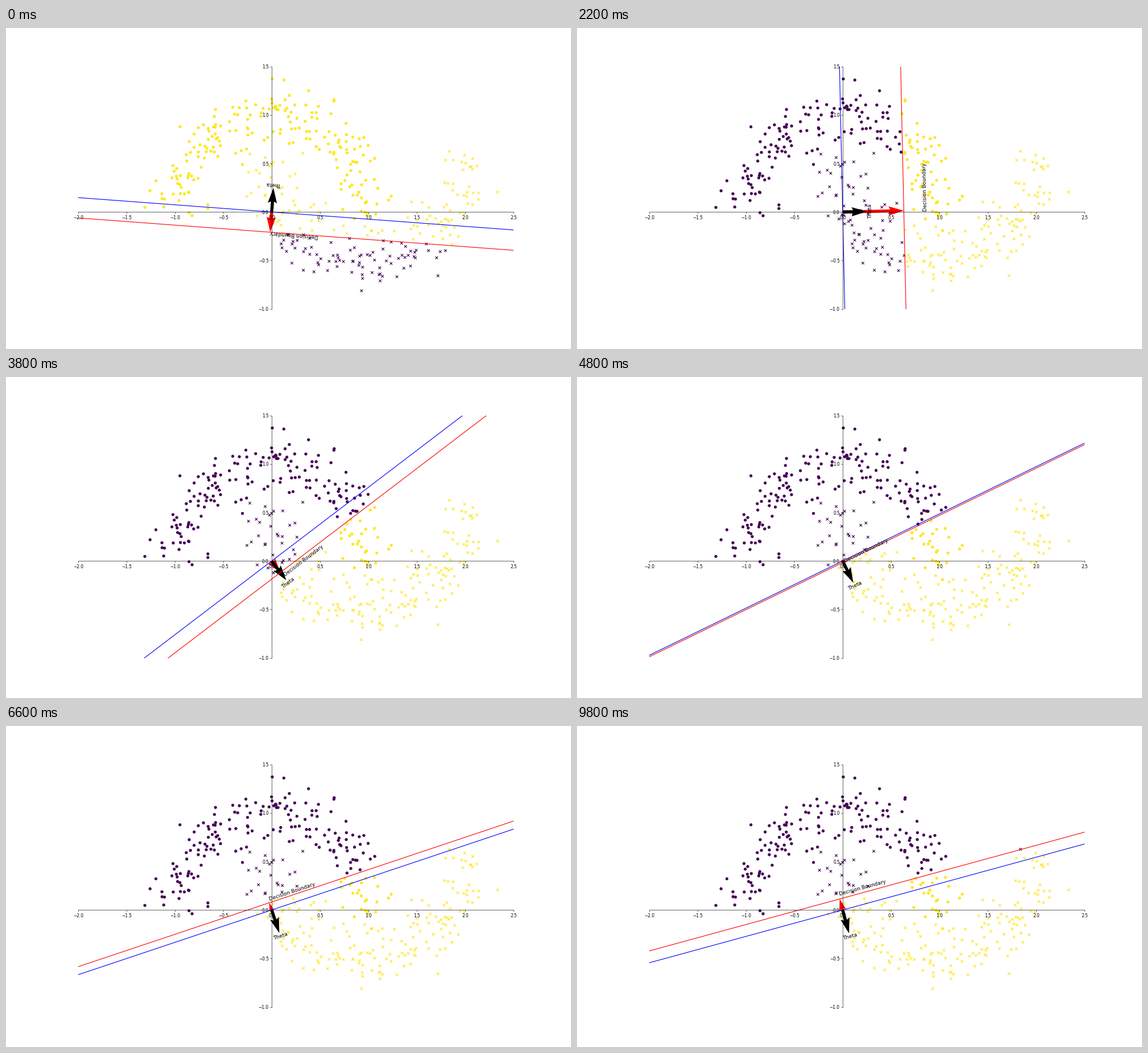
These frames come from a looping animation (993x564 px, 10000 ms). A matplotlib script:

```python
import numpy as np
import matplotlib.pyplot as plt
from matplotlib.animation import FuncAnimation

W, H, DPI = 993, 564, 54
FRAMES, INTERVAL = 50, 200
ARROW = 0.25

# frame: (angle of theta in degrees, signed distance of the boundary)
KEY_POSES = {0: (85.76, -.209), 6: (45, .53), 11: (1.26, .632),
             19: (-52.74, .149), 24: (-64.05, .0145),
             33: (-71.54, -.0785), 49: (-74.76, -.118)}


def moons(count=200, noise=0.15):
    """Two interleaving half circles with clipped Gaussian noise."""
    rng = np.random.RandomState(42)
    t = np.linspace(0, np.pi, count)
    halves = (np.c_[np.cos(t), np.sin(t)],
              np.c_[1 - np.cos(t), 0.5 - np.sin(t)])
    return [half + noise * rng.normal(size=half.shape).clip(-2.5, 2.5)
            for half in halves]


def descend(rate=0.4):
    """Least-squares gradient descent, using the expected moments of the moons."""
    moment = np.array([[1.02, -.068, .5], [-.068, .327, .25], [.5, .25, 1]])
    goal = np.array([.5, -.386, 0])
    p = 3 * np.array([.074, .997, .209])
    path = []
    for _ in range(FRAMES):
        path.append(p)
        p = p + rate * (goal - moment @ p)
    w1, w2, b = np.array(path).T
    return np.c_[np.degrees(np.arctan2(w2, w1)), -b / np.hypot(w1, w2)]


def pin(path, poses):
    """Shift the path gradually so that it passes through the key poses."""
    at = list(poses)
    gaps = np.array(list(poses.values())) - path[at]
    steps = np.arange(len(path))
    return path + np.c_[[np.interp(steps, at, gap) for gap in gaps.T]].T


poses = pin(descend(), KEY_POSES)

fig = plt.figure(figsize=(W / DPI + 1e-6, H / DPI + 1e-6), dpi=DPI,
                 facecolor="white")
ax = fig.add_axes([126.8 / W, 1 - 493.6 / H, 765.3 / W, 425.8 / H])
ax.set_xlim(-2, 2.5)
ax.set_ylim(-1, 1.5)
for side in ("top", "right"):
    ax.spines[side].set_visible(False)
for side in ("left", "bottom"):
    ax.spines[side].set_position("zero")

clouds = []
for points, marker in zip(moons(), "ox"):
    dots = ax.scatter(*points.T, c=np.zeros(len(points)), marker=marker,
                      cmap="viridis", vmin=0, vmax=1)
    clouds.append((points, dots))

blue, = ax.plot([], [], color="blue")
red, = ax.plot([], [], color="red")


def arrow(color):
    return ax.quiver([0], [0], [1], [0], color=color, angles="xy",
                     scale_units="xy", scale=1, width=0.007)


bias_arrow, theta_arrow = arrow("red"), arrow("black")
theta_text = ax.text(0, 0, "Theta", fontsize=12, ha="center", va="center",
                     rotation_mode="anchor")
bound_text = ax.text(0, 0, "Decision Boundary", fontsize=12)


def draw(i):
    angle, dist = poses[i]
    a = np.radians(angle)
    normal = np.array([np.cos(a), np.sin(a)])
    along = np.array([-normal[1], normal[0]])
    foot = dist * normal

    for points, dots in clouds:
        dots.set_array((points @ normal > dist).astype(float))
    for line, mid in ((blue, 0 * foot), (red, foot)):
        line.set_data(*np.array([mid - 8 * along, mid + 8 * along]).T)
    for shaft, (u, v) in ((bias_arrow, foot), (theta_arrow, ARROW * normal)):
        shaft.set_UVC([u], [v])
    for text, place in ((theta_text, 0.285 * normal), (bound_text, 1.3 * foot)):
        text.set_position(place)
        text.set_rotation(angle + 90)
    return []


anim = FuncAnimation(fig, draw, frames=FRAMES, interval=INTERVAL,
                     repeat=True, repeat_delay=0)
plt.show()
```
